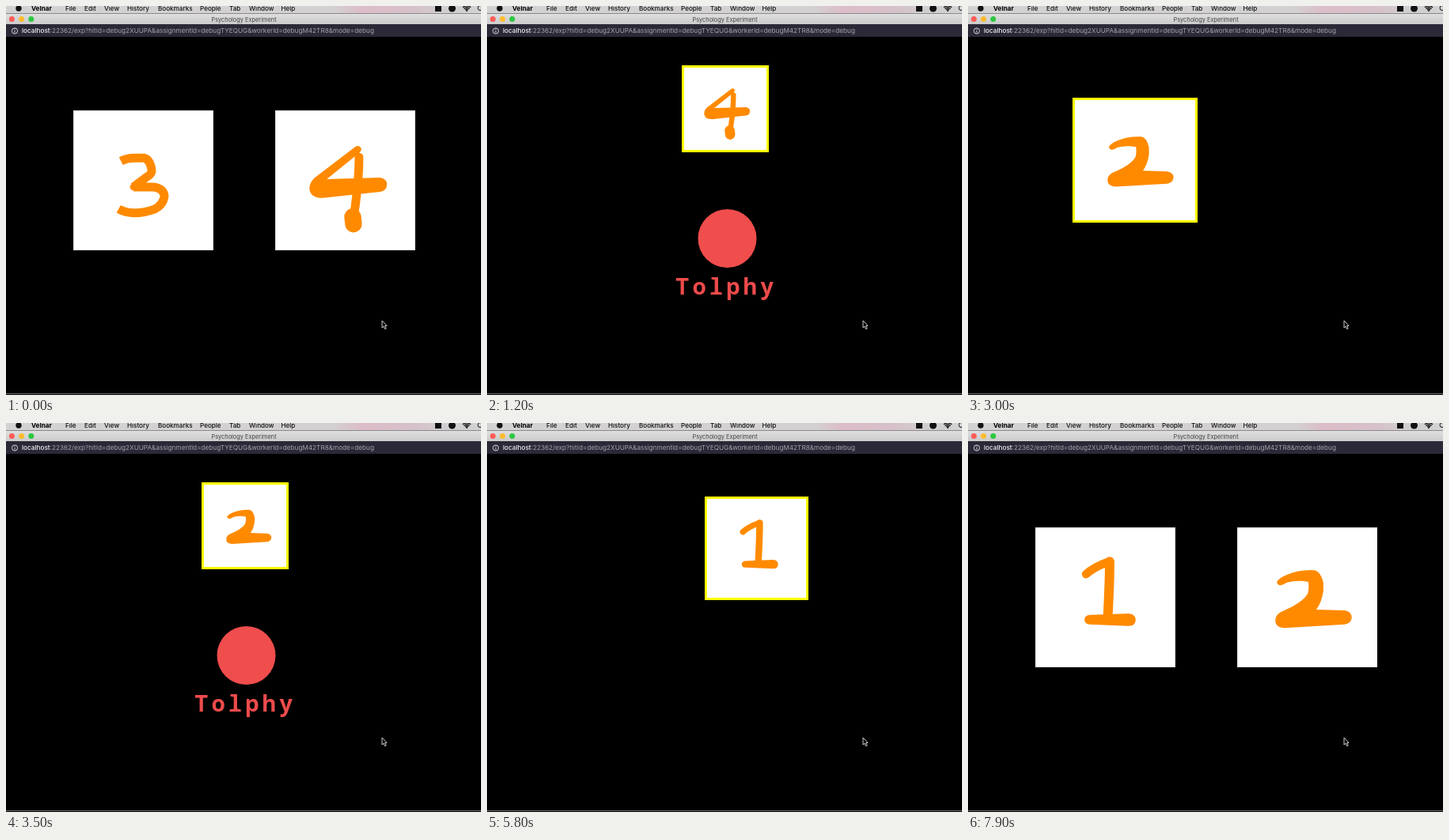
An HTML page with a canvas for the animation above (8000 ms loop, 600x492 px).

```html
<!DOCTYPE html>
<html lang="en">
<head>
<meta charset="utf-8">
<title>Psychology Experiment</title>
<style>
html, body { margin: 0; width: 100%; height: 100%; overflow: hidden; background: #000; }
canvas { display: block; width: 600px; height: 492px; }
</style>
</head>
<body>
<canvas id="stage" width="600" height="492"></canvas>
<script>
const canvas = document.getElementById('stage');
const ctx = canvas.getContext('2d');
const LOOP = 8000, STEP = 100;
const CARD = 177, SMALL = 110, MOVE = 500;
const ORANGE = '#ff8a00';
const UI = 'Inter, "Open Sans", sans-serif';
const MONO = '"Noto Sans Mono", "DejaVu Sans Mono", monospace';

// Brush marks per digit in card coordinates: path, width, cap; without a width the path is filled
const digits = {
  1: [
    ['M64 59 Q74 50 93 43', 10.5],
    ['M94 43 Q94 70 91.5 115', 12],
    ['M68 111 L118 109 Q127 110 127 117 Q127 125 118 125 L68 123 Q62 122 62 117 Q62 112 68 111 Z']
  ],
  2: [
    ['M50 69 Q52 64 62 60 Q78 53 98 54 Q106 56 109 70 L109 80 Q107 95 100 104 L136 105 ' +
     'Q146 107 145 115 Q144 122 136 123 L60 127.5 Q48 127 48 118 Q48 111 55 107 ' +
     'Q82 96 89 84 Q91 78 90 69 Q76 66 62 70 Q57 74 53 73 Q50 72 50 69 Z']
  ],
  3: [
    ['M60 64 Q68 60 76 60 L89 60 Q97 62 99 75 Q100 80 93 84 L76 97', 11, 'butt'],
    ['M76 97 L101 97 Q116 99 115 110 Q113 120 103 125 Q75 135 57 125', 11, 'butt'],
    ['M76 97 L90 97', 9]
  ],
  4: [
    ['M101 46 Q106 43 109 48 Q109 51 107 53 L65 87 L133 85 Q142 87 141.5 94 Q141 102 133 103 ' +
     'L60 111 Q44 111 43 99 Q43 91 50 85 Z'],
    ['M106 59 Q106 88 100 130', 11],
    ['M98 135 L99 144', 21.5]
  ]
};
for (const marks of Object.values(digits))
  for (const m of marks) m[0] = new Path2D(m[0]);

const red = { word: 'Tolphy', color: '#ee4b4b', font: '600 29px ' + MONO, gap: 4,
              x: 238, y: 365, disc: [303.5, 294, 37, '#f04d4d'] };
const plum = { word: 'Ulvom', color: '#6b0838', font: '700 33px ' + MONO, gap: 4.8,
               x: 268, y: 328, disc: [243, 311.5, 25.5, '#f3ebb4'] };

// Times in ms: cards shown, choice made, reward shown, blank
const trials = [
  { left: 3, right: 4, pick: 'right', show: 0, choose: 555, reward: 1100, end: 2200, logo: red },
  { left: 2, right: 3, pick: 'left', show: 2700, choose: 2855, reward: 3400, end: 4500, logo: red },
  { left: 4, right: 1, pick: 'right', show: 5000, choose: 5455, reward: 6000, end: 7100, logo: plum },
  { left: 1, right: 2, show: 7600, choose: LOOP, end: LOOP }
];
const sides = { left: { x: 173.5, endX: 302 }, right: { x: 428.5, endX: 300.8 } };

const lerp = (a, b, p) => a + (b - a) * p;

function rect(x, y, w, h, color) {
  ctx.fillStyle = color;
  ctx.fillRect(x, y, w, h);
}

function disc(x, y, r, color) {
  ctx.fillStyle = color;
  ctx.beginPath();
  ctx.arc(x, y, r, 0, Math.PI * 2);
  ctx.fill();
}

function text(str, x, y, font, color, gap = 0) {
  ctx.font = font;
  ctx.letterSpacing = gap + 'px';
  ctx.fillStyle = color;
  ctx.fillText(str, x, y);
  const w = ctx.measureText(str).width;
  ctx.letterSpacing = '0px';
  return w;
}

function card(digit, cx, cy, width, chosen) {
  const edge = chosen ? 3 : 0.5;
  const size = Math.round(width);
  const inner = size - 2 * edge;
  const x = Math.round(cx - width / 2), y = Math.round(cy - width / 2);
  rect(x, y, size, size, chosen ? '#ffff00' : '#c8c8c8');
  rect(x + edge, y + edge, inner, inner, '#fff');
  ctx.save();
  ctx.translate(x + edge, y + edge);
  ctx.scale(inner / CARD, inner / CARD);
  ctx.strokeStyle = ctx.fillStyle = ORANGE;
  ctx.lineJoin = 'round';
  for (const [path, lineWidth, cap = 'round'] of digits[digit]) {
    if (!lineWidth) {
      ctx.fill(path);
      continue;
    }
    ctx.lineWidth = lineWidth;
    ctx.lineCap = cap;
    ctx.stroke(path);
  }
  ctx.restore();
}

function menuBar() {
  const g = ctx.createLinearGradient(0, 0, 600, 0);
  g.addColorStop(0, '#d3d2d3');
  g.addColorStop(0.69, '#d3d0d2');
  g.addColorStop(0.75, '#dcbcc8');
  g.addColorStop(0.86, '#d6c0c9');
  g.addColorStop(0.92, '#d0ced0');
  g.addColorStop(1, '#d3d2d3');
  rect(0, 0, 600, 10, g);
  disc(16, 3, 3.7, '#111');
  text('Velnar', 32, 6, '700 8.2px ' + UI, '#000');
  const items = [['File', 75], ['Edit', 99], ['View', 124], ['History', 153], ['Bookmarks', 192],
                 ['People', 245], ['Tab', 282], ['Window', 307], ['Help', 347.5]];
  for (const [label, x] of items) text(label, x, 6, '500 8.1px ' + UI, '#111');
  rect(542, 0, 8, 7, '#111');
  disc(563.5, 3, 4.5, '#111');
  ctx.strokeStyle = '#111';
  ctx.lineCap = 'butt';
  ctx.lineWidth = 1.3;
  for (const r of [2.8, 5, 7.2]) {
    ctx.beginPath();
    ctx.arc(582, 7, r, -Math.PI * 0.75, -Math.PI * 0.25);
    ctx.stroke();
  }
  disc(582, 6, 1, '#111');
  ctx.lineWidth = 1;
  ctx.beginPath();
  ctx.arc(599, 2.5, 3, 0, Math.PI * 2);
  ctx.stroke();
}

function windowFrame() {
  rect(0, 9, 600, 1, '#8b898b');
  const g = ctx.createLinearGradient(0, 10, 0, 23);
  g.addColorStop(0, '#dedede');
  g.addColorStop(1, '#cbcbcb');
  rect(0, 10, 600, 13, g);
  ['#fc5b57', '#fdbc2e', '#2bc840'].forEach((c, i) => disc(7.4 + 12.2 * i, 16.5, 3.5, c));
  ctx.textAlign = 'center';
  text('Psychology Experiment', 300.5, 19.5, '7.4px ' + UI, '#444');
  ctx.textAlign = 'left';

  rect(0, 23, 600, 16, '#2b2837');
  ctx.strokeStyle = '#d8d7dc';
  ctx.lineWidth = 1;
  ctx.beginPath();
  ctx.arc(11, 31.5, 3.6, 0, Math.PI * 2);
  ctx.stroke();
  rect(10.5, 31, 1, 2.6, '#d8d7dc');
  rect(10.5, 29.3, 1, 1, '#d8d7dc');
  const w = text('localhost', 20, 34.3, '500 8.2px ' + UI, '#f1f0f4');
  text(':22362/exp?hitId=debug2XUUPA&assignmentId=debugTYEQUG&workerId=debugM42TR8&mode=debug',
       20 + w, 34.3, '8.2px ' + UI, '#a5a3ad');
  rect(0, 490, 600, 1, '#777');
}

const arrow = new Path2D('M475 398 V407 L477 405.2 L478.6 408.6 L480.2 407.8 L478.6 404.6 L481 404.4 Z');
function cursor() {
  ctx.fillStyle = '#000';
  ctx.fill(arrow);
  ctx.strokeStyle = '#e4e4e4';
  ctx.lineWidth = 0.9;
  ctx.lineJoin = 'miter';
  ctx.stroke(arrow);
}

function reward(logo) {
  disc(...logo.disc);
  text(logo.word, logo.x, logo.y, logo.font, logo.color, logo.gap);
}

function trial(t) {
  const now = trials.find(k => t >= k.show && t < k.end);
  if (!now) return;
  if (t < now.choose) {
    for (const side of ['left', 'right']) card(now[side], sides[side].x, 220.5, CARD, false);
    return;
  }
  const p = Math.min(1, (t - now.choose) / MOVE);
  const { x, endX } = sides[now.pick];
  card(now[now.pick], lerp(x, endX, p), lerp(220.5, 130.3, p), lerp(CARD, SMALL, p), true);
  if (t >= now.reward) reward(now.logo);
}

function draw(ms) {
  const t = Math.floor((ms % LOOP) / STEP) * STEP;
  rect(0, 0, 600, 492, '#000');
  menuBar();
  windowFrame();
  trial(t);
  cursor();
}

const start = performance.now();
function tick() {
  draw(performance.now() - start);
  requestAnimationFrame(tick);
}
tick();
</script>
</body>
</html>
```
